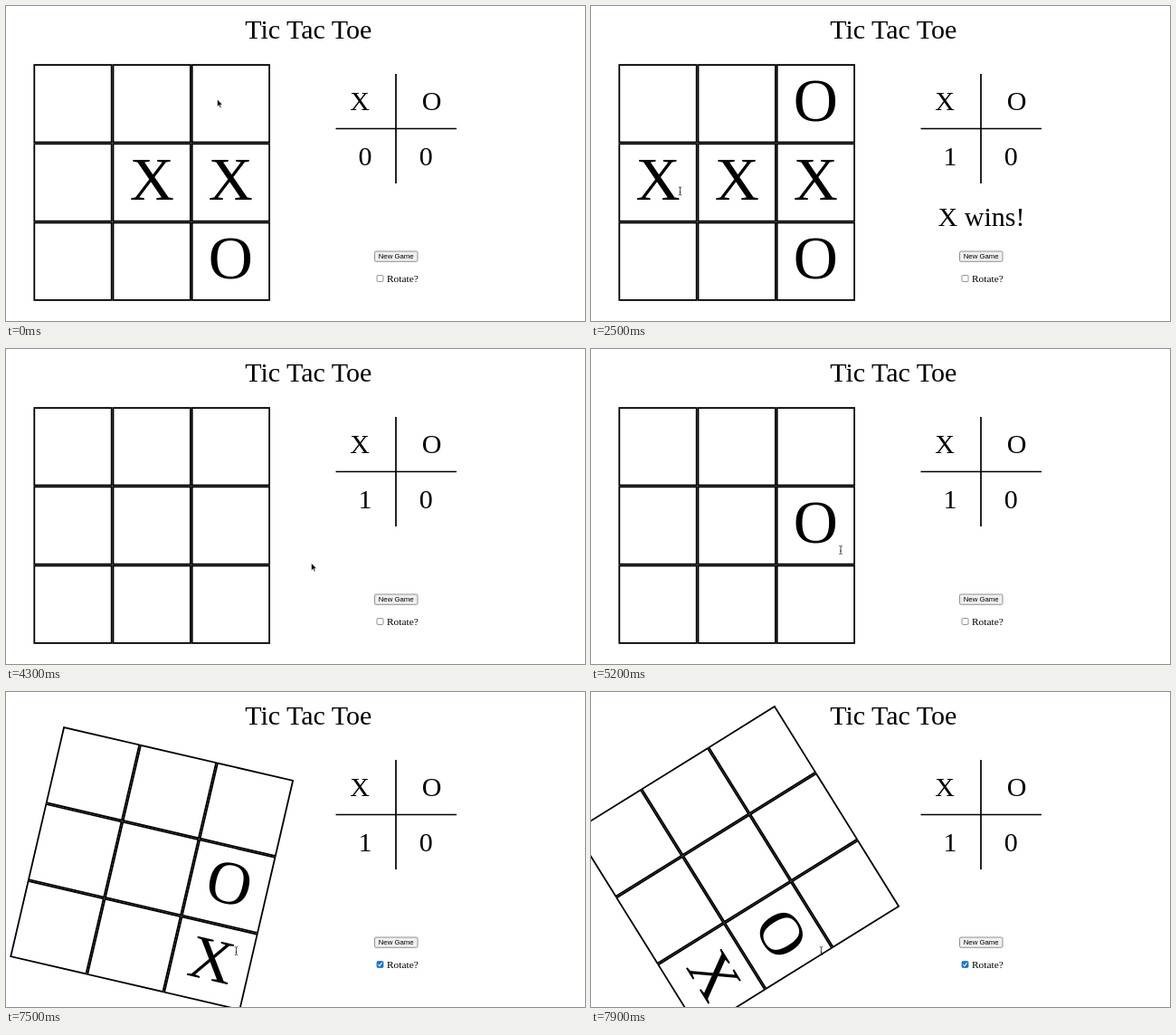
Animation of 640 by 348 pixels, one loop 8 s. Source, as an HTML page:

```html
<!DOCTYPE html>
<html lang="en">
<head>
<meta charset="utf-8">
<title>Tic Tac Toe</title>
<style>
  html, body { margin: 0; width: 100%; height: 100%; overflow: hidden; background: #fff; }
  svg { display: block; width: 640px; height: 348px; }
  text { font: 30px "Liberation Serif", Times, serif; text-anchor: middle; }
  #marks text { font-size: 68px; }
  #board rect { fill: none; stroke: #000; stroke-width: 1.8; }
</style>
</head>
<body>
<svg viewBox="0 0 640 348">
  <text x="334.3" y="36">Tic Tac Toe</text>
  <path d="M431 75V196M364.5 135.5H498" stroke="#000" stroke-width="1.7"/>
  <text x="391" y="115">X</text>
  <text x="470.5" y="115">O</text>
  <text id="score" x="397" y="176"></text>
  <text x="464.3" y="176">0</text>
  <text id="result" x="431.5" y="243">X wins!</text>

  <rect id="button" x="407.5" y="271" width="47.5" height="11.3" rx="1.5" stroke="#777" stroke-width=".8"/>
  <text x="431.2" y="279.4" style="font: 7.8px 'Liberation Sans', Arial, sans-serif">New Game</text>
  <rect id="box" x="410" y="297.5" width="7" height="7" rx="1.3" stroke-width=".8"/>
  <path id="tick" d="M411.5 301.2l1.4 1.5 2.6-3.6" fill="none" stroke="#fff" stroke-width="1.1"/>
  <text x="421" y="304.7" style="font-size: 11.4px; text-anchor: start">Rotate?</text>

  <g id="board"><g id="marks"></g></g>
  <path id="arrow" d="M0 0V8.2L1.9 6.5 3.2 9.4 4.6 8.8 3.3 6H5.8Z" stroke="#fff" stroke-width=".6"/>
  <path id="beam" d="M-1.7-4.5Q0-4.5 0-3.5Q0-4.5 1.7-4.5M0-3.5V3.5M-1.7 4.5Q0 4.5 0 3.5Q0 4.5 1.7 4.5M-1 1.2H1" fill="none" stroke="#222" stroke-width=".8"/>
</svg>
<script>
const LOOP = 8000, TICK = 100;
const SIZE = 87.2, LEFT = 30.4, TOP = 64.2, CX = LEFT + SIZE * 1.5, CY = TOP + SIZE * 1.5;
const WIN = 1600, RESET = 3800, CHECK = 6300;
const SPIN_START = 7289, SPIN_TIME = 1628;

// mark, cell, shown from, shown until
const moves = [
  ["X", 4, 0, RESET], ["X", 5, 0, RESET], ["O", 8, 0, RESET],
  ["O", 2, 500, RESET], ["X", 3, WIN, RESET],
  ["O", 5, 4700, LOOP], ["X", 8, 7300, LOOP]
];

// time, x, y of the pointer
const path = [
  [0, 233.5, 103], [800, 233.5, 106], [1400, 90, 207], [2400, 90, 207],
  [2500, 98.5, 204.5], [3300, 424, 284], [3600, 426, 277], [4100, 426, 277],
  [4500, 249, 196], [4700, 249, 196], [5200, 276, 222], [5500, 403, 301],
  [6100, 412, 299], [6700, 412, 299], [6800, 370, 303.5], [7100, 254.5, 286], [LOOP, 254.5, 286]
];

const el = id => document.getElementById(id);
const show = (node, on) => node.setAttribute("visibility", on ? "visible" : "hidden");

function add(parent, tag, attrs, text = "") {
  const node = document.createElementNS("http://www.w3.org/2000/svg", tag);
  for (const key in attrs) node.setAttribute(key, attrs[key]);
  node.textContent = text;
  return parent.appendChild(node);
}

const cellX = i => LEFT + i % 3 * SIZE;
const cellY = i => TOP + Math.floor(i / 3) * SIZE;

for (let i = 0; i < 9; i++)
  add(el("board"), "rect", { x: cellX(i) + .9, y: cellY(i) + .9, width: SIZE - 1.8, height: SIZE - 1.8 });
const labels = moves.map(([mark, cell]) =>
  add(el("marks"), "text", { x: cellX(cell) + SIZE / 2, y: cellY(cell) + SIZE / 2 + 18.7 }, mark));

// cubic-bezier(.25, .1, .25, 1)
function ease(p) {
  let lo = 0, hi = 1, s;
  for (let i = 0; i < 24; i++) {
    s = (lo + hi) / 2;
    if (.75 * s * (1 - s) + s ** 3 < p) lo = s; else hi = s;
  }
  return .3 * s * (1 - s) ** 2 + 3 * s * s * (1 - s) + s ** 3;
}

function pointer(t) {
  const i = path.findIndex(p => p[0] > t);
  const [t0, x0, y0] = path[i - 1], [t1, x1, y1] = path[i];
  const p = (t - t0) / (t1 - t0), k = p * p * (3 - 2 * p);
  return [x0 + (x1 - x0) * k, y0 + (y1 - y0) * k];
}

function draw(t) {
  const [x, y] = pointer(t);
  const col = Math.floor((x - LEFT) / SIZE), row = Math.floor((y - TOP) / SIZE);
  let overMark = false;
  moves.forEach(([, cell, from, until], i) => {
    const on = t >= from && t < until;
    show(labels[i], on);
    if (on && col < 3 && row * 3 + col === cell) overMark = true;
  });

  const angle = 90 * ease(Math.min(1, Math.max(0, (t - SPIN_START) / SPIN_TIME)));
  el("board").setAttribute("transform", t < SPIN_START ? "" : `rotate(${angle} ${CX} ${CY})`);

  el("score").textContent = t < WIN ? 0 : 1;
  show(el("result"), t >= WIN && t < RESET);
  const hover = x > 407 && x < 456 && y > 270 && y < 283;
  el("button").setAttribute("fill", hover ? "#e5e5e5" : "#efefef");
  const checked = t >= CHECK;
  el("box").setAttribute("fill", checked ? "#1a73d8" : "#fff");
  el("box").setAttribute("stroke", checked ? "#1a73d8" : "#777");
  show(el("tick"), checked);

  for (const id of ["arrow", "beam"]) {
    el(id).setAttribute("transform", `translate(${x} ${y})`);
    show(el(id), (id === "beam") === overMark);
  }
}

const start = performance.now();
function frame(now) {
  const t = Math.max(0, now - start) % LOOP;
  draw(Math.floor(t / TICK) * TICK);
  requestAnimationFrame(frame);
}
draw(0);
requestAnimationFrame(frame);
</script>
</body>
</html>
```
